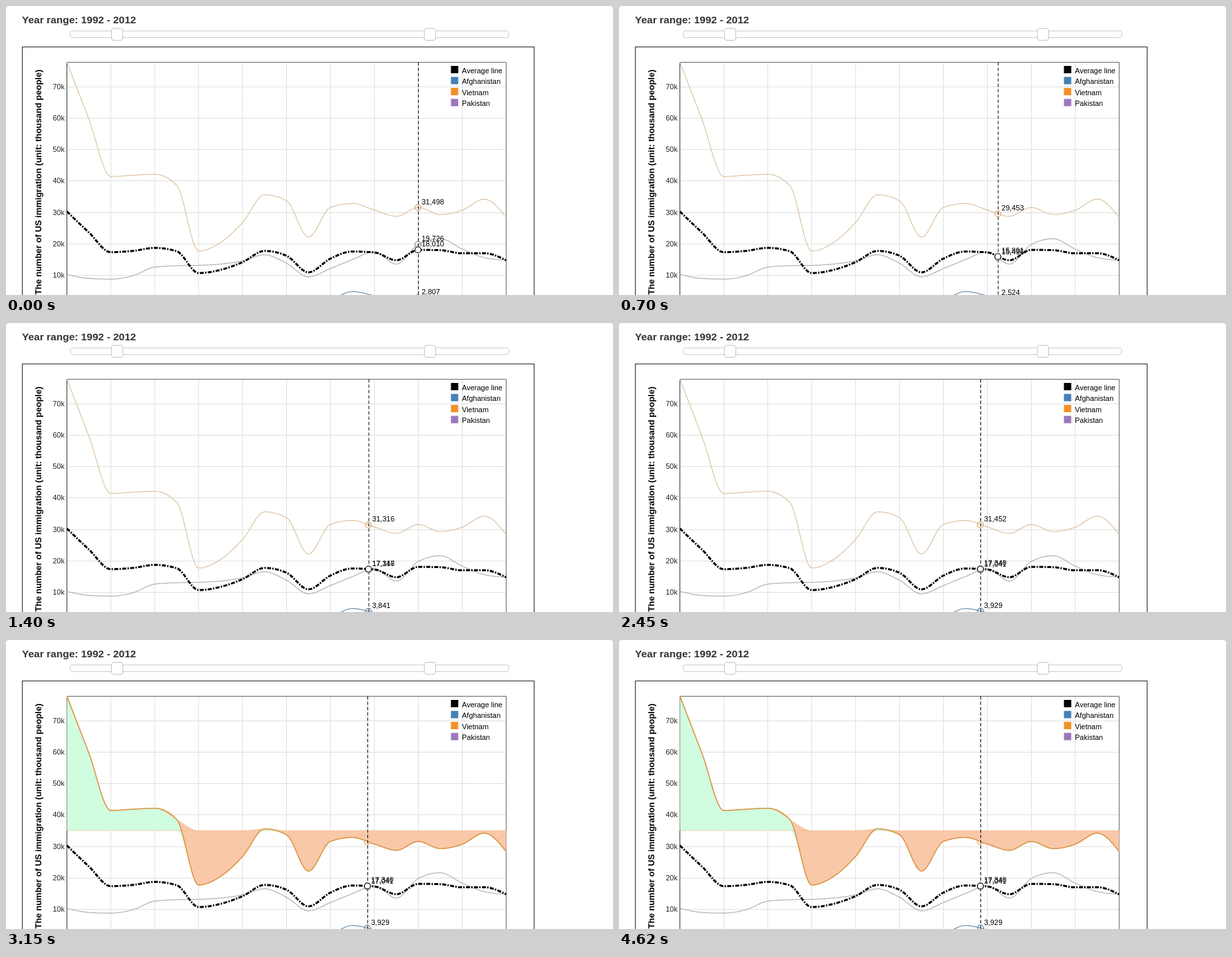
An HTML page that plays this animation: 912x434 px, repeating every 4690 ms.

```html
<!DOCTYPE html>
<html lang="en">
<head>
<meta charset="utf-8">
<title>Immigration chart</title>
<style>
  html, body { margin: 0; width: 100%; height: 100%; overflow: hidden; background: #c4c4c4; }
  svg { display: block; width: 912px; height: 434px; }
  text { font: 11px "Liberation Sans", Arial, sans-serif; fill: #000; }
  .title { font-size: 15.5px; font-weight: bold; fill: #333; }
  .axis { font-size: 13px; font-weight: bold; }
  .tick { text-anchor: end; fill: #222; }
</style>
</head>
<body>
<svg id="stage" viewBox="0 0 912 434"></svg>
<script>
const LOOP = 4690, STEP = 70;
const LEFT = 91.5, TOP = 84.5, RIGHT = 751.5, BASE = 451.25, GAP = 33, YEARS = 20;

// yearly values, 1992 to 2012
const vietnam = [77735, 59614, 41345, 41752, 42067, 38519, 17649, 20393, 26747, 35531, 33627,
  22087, 31524, 32784, 30691, 28691, 31498, 29234, 30632, 34157, 28304];
const pakistan = [10214, 8927, 8698, 9774, 12519, 12967, 13094, 13496, 14535, 16448, 13743,
  9444, 12086, 14926, 17418, 13492, 19726, 21555, 18258, 15546, 14740];
const bump = (i, centre, width, height) => height * Math.exp(-(((i - centre) / width) ** 2));
const afghanistan = vietnam.map((_, i) =>
  1000 + 1700 * Math.exp(-i / 2.5) + bump(i, 13.214, 1.09, 3896) + bump(i, 16.6, 1.5, 2110));
const average = vietnam.map((v, i) => (v + pakistan[i] + afghanistan[i]) / 3);
const mean = vietnam.reduce((a, b) => a + b) / vietnam.length;

// time and cursor position at each turn of the pointer
const turns = [[0, 619.5], [280, 618.5], [420, 618.5], [930, 534],
  [1100, 554.6], [1190, 554.6], [1470, 543.5]];

const svg = document.getElementById("stage");
const px = i => LEFT + GAP * i;
const py = v => BASE - v * 0.00472;
const clamp = t => Math.max(0, Math.min(1, t));
const ease = t => (1 - Math.cos(Math.PI * t)) / 2;

function add(tag, attrs, parent = svg, content = "") {
  const el = document.createElementNS("http://www.w3.org/2000/svg", tag);
  for (const k in attrs) el.setAttribute(k, attrs[k]);
  el.textContent = content;
  return parent.appendChild(el);
}
const line = (x1, y1, x2, y2, stroke, more) => add("line", { x1, y1, x2, y2, stroke, ...more });
const label = (x, y, content, cls = "") => add("text", { x, y, class: cls }, svg, content);

// monotone cubic interpolation
function slope(d, i) {
  const inner = i => {
    const a = d[i] - d[i - 1], b = d[i + 1] - d[i];
    return (Math.sign(a) + Math.sign(b)) * Math.min(Math.abs(a), Math.abs(b), Math.abs(a + b) / 4);
  };
  if (i === 0) return (3 * (d[1] - d[0]) - inner(1)) / 2;
  if (i === YEARS) return (3 * (d[i] - d[i - 1]) - inner(i - 1)) / 2;
  return inner(i);
}

function valueAt(d, x) {
  const pos = (x - LEFT) / GAP;
  const i = Math.min(YEARS - 1, Math.floor(pos)), t = pos - i, u = 1 - t;
  return d[i] + (d[i + 1] - d[i]) * t * t * (3 - 2 * t) +
    slope(d, i) * t * u * u - slope(d, i + 1) * t * t * u;
}

function points(d) {
  const list = [];
  for (let x = LEFT; x <= RIGHT; x += 1.5) list.push(x + "," + py(valueAt(d, x)).toFixed(2));
  return list;
}
const trace = (d, attrs, parent) =>
  add("polyline", { points: points(d).join(" "), fill: "none", ...attrs }, parent);
const band = (a, b, fill, parent) =>
  add("polygon", { points: [...points(a), ...points(b).reverse()].join(" "), fill }, parent);

// page, heading and range slider
add("path", { d: "M0,434V4Q0,0 4,0H908Q912,0 912,4V434Z", fill: "#fff" });
label(24, 26, "Year range: 1992 - 2012", "title");
add("rect", { x: 96.5, y: 37.5, width: 659, height: 10, rx: 3.5, fill: "#fff", stroke: "#ccc" });
for (const x of [158.5, 628.5])
  add("rect", { x, y: 33.5, width: 17, height: 18, rx: 3.5, fill: "#fff", stroke: "#c4c4c4" });

// frame, grid and axes
add("rect", { x: 24.5, y: 61.5, width: 769, height: 500, fill: "none", stroke: "#222" });
for (let i = 2; i < YEARS; i += 2) line(px(i), TOP, px(i), 434, "#e0e0e0");
for (let k = 10; k <= 70; k += 10) {
  const y = Math.round(py(k * 1000)) + 0.5;
  line(LEFT, y, RIGHT, y, "#e0e0e0");
  label(88, y + 3.5, k + "k", "tick");
}
add("path", { d: `M${LEFT},434V${TOP}H${RIGHT}V434`, fill: "none", stroke: "#666" });
line(LEFT, TOP, LEFT, 434, "#333");
add("text", { class: "axis", "text-anchor": "end", transform: "translate(52.5,95.5) rotate(-90)" },
  svg, "The number of US immigration (unit: thousand people)");

// legend
[["Average line", "#000"], ["Afghanistan", "#4580b8"], ["Vietnam", "#f29127"], ["Pakistan", "#9b78bb"]]
  .forEach(([name, fill], i) => {
    add("rect", { x: 668.5, y: 90 + 16.5 * i, width: 11, height: 11, fill });
    label(685, 100.5 + 16.5 * i, name);
  });

// series, in drawing order
const series = [
  { data: pakistan, stroke: "#b1afb7", ring: "#8d8995" },
  { data: afghanistan, stroke: "#6e8fad", ring: "#5c83a8" },
  { data: vietnam, stroke: "#dcc1a2", ring: "#dda062" },
  { data: average, stroke: "#000", ring: "#000", width: 3, dash: "6 2 2 2", fill: "#fff" }
];
for (const s of series)
  trace(s.data, { stroke: s.stroke, "stroke-width": s.width || 1.2, "stroke-dasharray": s.dash || "none" });

const under = add("g", {});
const area = add("g", {});
const rule = line(0, TOP, 0, 434, "#000", { "stroke-dasharray": "5 3" });
const over = add("g", {});

for (const s of series) {
  const g = s.data === vietnam ? under : over;
  s.dot = add("circle", { r: 4.5, fill: s.fill || "none", stroke: s.ring, "stroke-width": 1.2 }, g);
  s.text = add("text", {}, g);
}

// difference from the mean
band(vietnam, vietnam.map(v => Math.min(v, mean)), "#d0fcdf", area);
band(vietnam, vietnam.map(v => Math.max(v, mean)), "#f9c8a9", area);
trace(vietnam.map(() => mean), { stroke: "#eab070", "stroke-dasharray": "2 2" }, area);
trace(vietnam, { stroke: "#dc9645", "stroke-width": 1.6 }, area);

function cursorAt(t) {
  const n = turns.findIndex(turn => turn[0] > t);
  if (n < 0) return turns[turns.length - 1][1];
  const [t0, x0] = turns[n - 1], [t1, x1] = turns[n];
  return x0 + (x1 - x0) * ease((t - t0) / (t1 - t0));
}

function draw(t) {
  const x = cursorAt(t);
  rule.setAttribute("x1", x);
  rule.setAttribute("x2", x);
  for (const s of series) {
    const v = valueAt(s.data, x), y = py(v);
    s.dot.setAttribute("cx", x - 0.5);
    s.dot.setAttribute("cy", y);
    s.text.setAttribute("x", x + 5);
    s.text.setAttribute("y", y - 5);
    s.text.textContent = Math.round(v).toLocaleString("en-US");
  }
  area.setAttribute("opacity", clamp((t - 2450) / 280));
}

const start = performance.now();
function tick() {
  const t = (performance.now() - start) % LOOP;
  draw(Math.floor(t / STEP) * STEP);
  requestAnimationFrame(tick);
}
draw(0);
requestAnimationFrame(tick);
</script>
</body>
</html>
```
